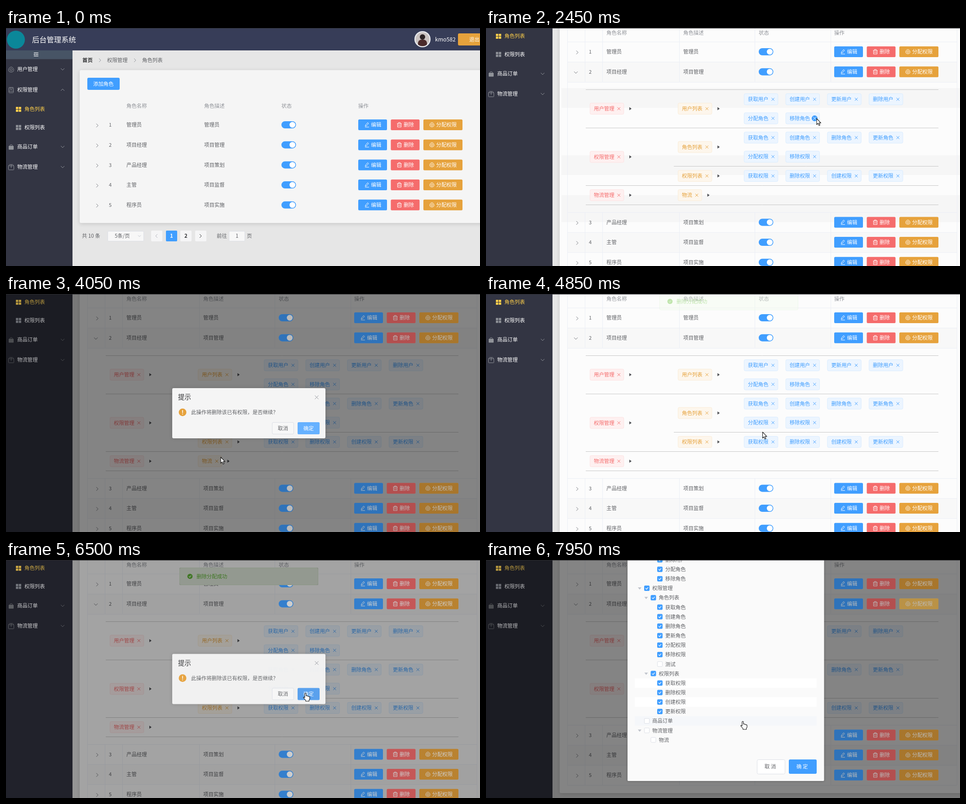
An HTML page with a canvas that plays this animation: 1055 px wide and 531 px high, repeating every 8000 ms.

```html
<!DOCTYPE html>
<html lang="zh-CN">
<head>
<meta charset="utf-8">
<style>
html, body { margin: 0; width: 100%; height: 100%; overflow: hidden; background: #e6e6e6; }
canvas { display: block; font-family: "Noto Sans CJK SC", sans-serif; }
</style>
</head>
<body>
<canvas id="stage" width="1055" height="531"></canvas>
<script>
const c = document.getElementById('stage').getContext('2d');
const W = 1055, H = 531, LOOP = 8000, ROW = 44.7;
const FONT = '"Noto Sans CJK SC","Noto Sans CJK",sans-serif';
const BLUE = '#409eff', RED = '#f56c6c', ORANGE = '#e6a23c';
const GRAY = '#909399', WHITE = '#fff', GOLD = '#ffd04b';
const TAGS = {
  red: ['#fef0f0', '#fde2e2', RED],
  orange: ['#fdf6ec', '#faecd8', ORANGE],
  blue: ['#ecf5ff', '#d9ecff', BLUE]
};
const ROLES = [['管理员', '管理员'], ['项目经理', '项目管理'], ['产品经理', '项目策划'], ['主管', '项目监督'], ['程序员', '项目实施']];
const MENU = [['用户管理', 92], ['权限管理', 138], ['商品订单', 265], ['物流管理', 310]];
// Leading dots give the depth, a trailing dash an unchecked box.
const TREE = ('用户管理 .用户列表 ..获取用户 ..创建用户 ..更新用户 ..删除用户 ..分配角色 ..移除角色 ' +
  '权限管理 .角色列表 ..获取角色 ..创建角色 ..删除角色 ..更新角色 ..分配权限 ..移除权限 ..测试- ' +
  '.权限列表 ..获取权限 ..删除权限 ..创建权限 ..更新权限 商品订单- 物流管理- .物流-').split(' ');
const EXPAND = 1100, DELETE_CHILD = 4750, DELETE_PARENT = 6760;
// time, x, y, hand
const POINTER = [
  [100, 1042, 22, 0], [400, 800, 250, 0], [800, 203, 257, 1], [1150, 203, 257, 0], [1350, 442, 280, 0],
  [1650, 600, 245, 0], [1850, 739, 197, 0], [2100, 739, 197, 0], [2125, 736, 202, 1], [2450, 736, 202, 0],
  [2900, 481, 371, 0], [3050, 480, 370, 0], [3350, 470, 372, 1], [3850, 468, 372, 0], [3950, 477, 365, 0],
  [4050, 478, 364, 0], [4400, 666, 298, 1], [4700, 666, 298, 0], [5350, 298, 371, 1], [5560, 298, 371, 0],
  [5650, 325, 363, 0], [6200, 665, 297, 1], [6600, 665, 297, 0], [7150, 958, 100, 1], [7300, 958, 100, 0],
  [7600, 640, 270, 1], [7900, 570, 360, 1]
];

const clamp = v => Math.max(0, Math.min(1, v));
const ramp = (t, start, length) => clamp((t - start) / length);
const smooth = v => v * v * (3 - 2 * v);

function box(x, y, w, h, r, fill, border) {
  c.beginPath();
  c.roundRect(x, y, w, h, r);
  if (fill) { c.fillStyle = fill; c.fill(); }
  if (border) { c.strokeStyle = border; c.lineWidth = 1; c.stroke(); }
}
function disc(x, y, r, fill) {
  c.beginPath();
  c.arc(x, y, r, 0, 7);
  c.fillStyle = fill;
  c.fill();
}
function line(color, width, ...p) {
  c.beginPath();
  for (let i = 0; i < p.length; i += 2) c.lineTo(p[i], p[i + 1]);
  c.strokeStyle = color;
  c.lineWidth = width;
  c.stroke();
}
function shape(fill, ...p) {
  c.beginPath();
  for (let i = 0; i < p.length; i += 2) c.lineTo(p[i], p[i + 1]);
  c.closePath();
  c.fillStyle = fill;
  c.fill();
}
function text(s, x, y, color = '#606266', size = 11.4, weight = 400) {
  c.font = `${weight} ${size}px ${FONT}`;
  c.fillStyle = color;
  c.fillText(s, x, y + size * .38);
}
const cross = (x, y, r, color) => {
  line(color, 1, x - r, y - r, x + r, y + r);
  line(color, 1, x + r, y - r, x - r, y + r);
};
function chevron(x, y, angle, color = GRAY, r = 4) {
  c.save();
  c.translate(x, y);
  c.rotate(angle);
  line(color, 1, -r / 2, -r, r / 2, 0, -r / 2, r);
  c.restore();
}
function check(x, y, r, color) {
  line(color, 1.3, x - r, y, x - r * .2, y + r * .75, x + r, y - r * .7);
}

function gear(x, y, r, color) {
  c.beginPath();
  for (let i = 0; i < 12; i++) {
    const a = i * Math.PI / 6 + .26, d = i % 4 < 2 ? r : r * .92;
    c.lineTo(x + d * Math.cos(a), y + d * Math.sin(a));
  }
  c.closePath();
  c.moveTo(x + r * .42, y);
  c.arc(x, y, r * .42, 0, 7);
  c.strokeStyle = color;
  c.lineWidth = 1;
  c.stroke();
}
function pencil(x, y) {
  line(WHITE, 1, x - 3.5, y + 3, x - 2.5, y, x + 2, y - 5, x + 4, y - 3, x - .5, y + 2, x - 3.5, y + 3);
  line(WHITE, 1, x - 4, y + 5, x + 5, y + 5);
}
function trash(x, y) {
  line(WHITE, 1, x - 5, y - 3, x + 5, y - 3);
  line(WHITE, 1, x - 2, y - 3, x - 2, y - 5, x + 2, y - 5, x + 2, y - 3);
  line(WHITE, 1, x - 4, y - 3, x - 4, y + 5, x + 4, y + 5, x + 4, y - 3);
  line(WHITE, 1, x - 1.5, y - 1, x - 1.5, y + 3);
  line(WHITE, 1, x + 1.5, y - 1, x + 1.5, y + 3);
}
function grid(x, y, color) {
  for (const dx of [-6, .5]) for (const dy of [-5.5, .5]) box(x + dx, y + dy, 5.3, 5, 0, color);
}

function stateAt(t) {
  const open = t >= EXPAND;
  const fade = (start, end) => ramp(t, start, 220) * (1 - ramp(t, end, 220));
  const confirm = Math.max(fade(3825, 4490), fade(5570, 6493));
  const assign = ramp(t, 7240, 260);
  // The backdrop leaves a little ahead of its dialog.
  const backdrop = Math.max(fade(3825, 4440), fade(5570, 6443), assign);
  let i = POINTER.findIndex(p => p[0] > t);
  if (i < 0) i = POINTER.length;
  const from = POINTER[Math.max(0, i - 1)], to = POINTER[Math.min(i, POINTER.length - 1)];
  const k = to === from ? 1 : smooth(ramp(t, from[0], to[0] - from[0]));
  return {
    t, open, confirm, assign,
    dim: .48 * backdrop,
    scroll: 163 * smooth(ramp(t, 1430, 350)),
    extra: !open ? 0 : t < DELETE_PARENT ? 291 : 248,
    cols: open ? [268, 439, 607, 775] : [268, 441, 613, 784],
    pointer: { x: from[1] + (to[1] - from[1]) * k, y: from[2] + (to[2] - from[2]) * k,
               hand: from[3], shown: t >= 100 }
  };
}
const rowY = (i, s) => 216 + i * ROW + (i > 1 ? s.extra : 0);

function drawHeader(s) {
  const shift = s.open ? -14 : 0;
  box(0, 0, W, 50, 0, '#373d58');
  disc(22, 26, 20, '#0b8799');
  text('后台管理系统', 58, 26, WHITE, 16.3, 500);
  disc(927 + shift, 25, 18, '#e9ebef');
  c.save();
  c.beginPath();
  c.arc(927 + shift, 25, 15.5, 0, 7);
  c.clip();
  box(905 + shift, 5, 44, 44, 0, '#c9c2c0');
  disc(927 + shift, 20, 6, '#2b2224');
  box(917 + shift, 26, 20, 24, 8, '#4a2a2a');
  c.restore();
  text('kmo582', 955 + shift, 25, WHITE, 12.2);
  box(1006 + shift, 12, 80, 27, 3, ORANGE);
  text('退出', 1031 + shift, 25.5, WHITE, 11.4, 500);
}

function drawSidebar() {
  box(0, 50, 148, 700, 0, '#333543');
  box(0, 50, 148, 19.5, 0, '#475465');
  for (const y of [55.5, 59, 62.5]) line(WHITE, 1.3, y === 59 ? 65 : 62, y, 72, y);
  shape(WHITE, 61.5, 59, 64, 57.3, 64, 60.7);
  MENU.forEach(([, y], i) => chevron(126, y, i === 1 ? -Math.PI / 2 : Math.PI / 2));
  gear(11.5, 93, 6, GRAY);
  box(6.5, 132.5, 10, 12, 1, null, GRAY);
  line(GRAY, 1, 6.5, 141, 16.5, 141);
  line(GRAY, 1, 9.5, 133, 9.5, 137, 13.5, 137, 13.5, 133);
  box(6, 263, 11, 8.5, 1, GRAY);
  c.beginPath(); c.arc(11.5, 263, 2.8, Math.PI, 0); c.stroke();
  box(5.5, 307.5, 12, 9, 1, null, GRAY);
  line(GRAY, 1, 5.5, 308, 8, 304.5, 15, 304.5, 17.5, 308);
  line(GRAY, 1, 11.5, 305, 11.5, 312);
}

function drawMenuLabels(s) {
  c.save();
  c.globalAlpha = 1 - s.dim * .65;
  MENU.forEach(([label, y]) => text(label, 25, y, WHITE, 11.4, 500));
  grid(28, 181.5, GOLD);
  text('角色列表', 41, 181, GOLD, 11.4, 500);
  grid(28, 222, GRAY);
  text('权限列表', 41, 222, WHITE, 11.4, 500);
  c.restore();
}

function drawPager() {
  text('共 10 条', 169, 464);
  box(226.5, 453.5, 80, 22, 2, '#f7f7f7', '#dcdfe6');
  text('5条/页', 242, 464);
  chevron(297, 464, Math.PI / 2, '#c0c4cc', 3);
  [323, 356, 388, 421].forEach((x, i) => box(x, 452, 25, 24, 2, i === 1 ? BLUE : '#f5f5f6'));
  chevron(335, 464, Math.PI, '#b0b3ba');
  text('1', 365, 464, WHITE, 11.4, 700);
  text('2', 397, 464, '#303133', 11.4, 700);
  chevron(433, 464, 0, '#303133');
  text('前往', 469, 464);
  box(496.5, 453.5, 35, 22, 2, '#f7f7f7', '#dcdfe6');
  text('1', 511, 464);
  text('页', 536, 464);
}

function drawTag(s, kind, label, x, y) {
  const [fill, border, color] = TAGS[kind], w = 31 + label.length * 11.3;
  box(x + .5, y - 12.5, w - 1, 25, 3, fill, border);
  text(label, x + 9, y, color);
  const cx = x + w - 11.5;
  const hover = !s.dim && s.pointer.shown &&
    Math.hypot(s.pointer.x - cx, s.pointer.y + s.scroll - y) < 6;
  if (hover) disc(cx, y, 6.5, color);
  cross(cx, y, 3.2, hover ? WHITE : color);
}
const caret = (x, y) => shape('#505256', x, y - 3.5, x + 5, y, x, y + 3.5);

function drawExpanded(s) {
  const rule = (x, y) => line('#c6c6c6', 1, x, y, 1007, y);
  const parent = (label, y) => { drawTag(s, 'red', label, 231, y); caret(319, y); };
  const child = (label, y) => { drawTag(s, 'orange', label, 427, y); caret(470 + label.length * 11.3, y); };
  const leaves = (names, y) => names.split(' ').forEach((n, i) => drawTag(s, 'blue', n, 574 + i * 92.7, y));
  rule(222, 300.5); rule(222, 386); rule(418, 471.5); rule(222, 514.5);
  parent('用户管理', 343);
  child('用户列表', 343);
  leaves('获取用户 创建用户 更新用户 删除用户', 322);
  leaves('分配角色 移除角色', 364.5);
  parent('权限管理', 450.5);
  child('角色列表', 428.5);
  leaves('获取角色 创建角色 删除角色 更新角色', 407.5);
  leaves('分配权限 移除权限', 450);
  child('权限列表', 493);
  leaves('获取权限 删除权限 创建权限 更新权限', 493);
  if (s.t < DELETE_PARENT) {
    parent('物流管理', 536);
    if (s.t < DELETE_CHILD) child('物流', 536);
    rule(222, 557.5);
  }
}

function drawCard(s) {
  const bottom = 435 + s.extra;
  c.save();
  c.shadowColor = 'rgba(0,0,0,.14)';
  c.shadowBlur = 10;
  c.shadowOffsetY = 2;
  box(164, 94, 950, bottom - 94, 3, s.open ? '#fcfcfc' : '#f5f5f5');
  c.restore();
  if (!s.open) return;
  if (!s.scroll) box(164, 94, W, 100, 0, '#f8f8f8');
  if (s.t < 3850) {
    const bands = s.scroll ? [[134, 44], [284, 44], [373, 60]] : [[284, 44], [373, 60]];
    bands.forEach(([y, h]) => box(168, y + s.scroll, W, h, 0, '#f6f6f6'));
  }
  const edge = '#ebeef5';
  const py = s.pointer.y + s.scroll;
  ROLES.forEach((_, i) => {
    const top = rowY(i, s) - 22;
    const hover = !s.dim && py >= top && py < top + ROW;
    if (hover || i % 2) box(181, top, 867, ROW, 0, hover ? '#f5f7fa' : '#f8f8f8');
  });
  line(edge, 1, 181.5, 155, 181.5, bottom - 18);
  line(edge, 1, 1048.5, 155, 1048.5, bottom - 18);
  const columns = (top, end) => [220.5, 259.5, 430.5, 598.5, 767.5].forEach(x => line(edge, 1, x, top, x, end));
  columns(155, 283);
  columns(283 + s.extra, bottom - 18);
  [194, 239, 284].forEach(y => line(edge, 1, 181, y, 1048, y));
  [0, 1, 2, 3].forEach(i => line(edge, 1, 181, 283.5 + s.extra + i * ROW, 1048, 283.5 + s.extra + i * ROW));
  drawExpanded(s);
}

function drawTable(s) {
  box(181, 111, 72, 27, 3, BLUE);
  text('添加角色', 194, 125, WHITE, 11.4, 500);
  ['角色名称', '角色描述', '状态', '操作'].forEach((h, i) => text(h, s.cols[i], 174, GRAY, 11.4, 500));
  ROLES.forEach((role, i) => {
    const y = rowY(i, s), turn = i === 1 ? ramp(s.t, EXPAND, 180) : 0;
    chevron(203 - 3 * turn, y + 1.5, turn * Math.PI / 2, '#707379');
    text(i + 1, 229, y, '#606266', 11);
    role.forEach((label, j) => text(label, s.cols[j], y));
  });
}

function drawControls(s) {
  const shade = `rgba(0,0,0,${s.dim * .56})`;
  ROLES.forEach((_, i) => {
    const y = rowY(i, s), tx = s.cols[2], x = s.cols[3];
    box(tx, y - 8, 32.5, 16, 8, BLUE);
    disc(tx + 24.5, y, 6.5, WHITE);
    box(tx, y - 8, 32.5, 16, 8, shade);
    const hovered = i === 1 && s.t > 7100;
    [[0, 64, BLUE, '编辑'], [72.5, 64, RED, '删除'], [145, 87, hovered ? '#ffc860' : ORANGE, '分配权限']].forEach(([dx, w, fill, label], j) => {
      const bx = x + dx;
      box(bx, y - 12, w, 24, 2.5, fill);
      [pencil, trash, (gx, gy) => gear(gx, gy, 5, WHITE)][j](bx + 19, y);
      text(label, bx + 28.5, y, WHITE, 11.4, 500);
      box(bx, y - 12, w, 24, 2.5, shade);
    });
  });
}

function drawMessage(s, start, y) {
  const k = ramp(s.t, start, 260);
  if (!k) return;
  c.save();
  c.globalAlpha = k;
  c.translate(0, y - 30 * (1 - smooth(k)));
  box(386.5, .5, 308, 38, 3, '#f0f9eb', '#e1f3d8');
  disc(409.5, 19.5, 5.8, '#67c23a');
  check(409.5, 19.5, 2.6, WHITE);
  text('删除分配成功', 424, 19.5, '#67c23a');
  box(386, 0, 309, 39, 3, `rgba(0,0,0,${s.dim * 1.1})`);
  c.restore();
}

function drawConfirm(s) {
  if (!s.confirm) return;
  const { x, y } = s.pointer;
  const hover = x > 649 && x < 698 && y > 286 && y < 313;
  c.save();
  c.globalAlpha = s.confirm;
  c.translate(0, -16 * (1 - s.confirm));
  c.shadowColor = 'rgba(0,0,0,.15)';
  c.shadowBlur = 8;
  box(370, 210, 341, 112, 3, '#f5f5f5');
  c.shadowBlur = 0;
  text('提示', 383, 230, '#303133', 14.4);
  cross(691.5, 230.5, 4, GRAY);
  disc(393, 264, 8.5, ORANGE);
  line(WHITE, 1.6, 393, 259, 393, 265.5);
  disc(393, 268, 1, WHITE);
  text('此操作将删除该已有权限，是否继续？', 412, 264);
  box(592.5, 286.5, 48, 26, 2.5, '#f7f7f7', '#dcdfe6');
  text('取消', 605, 299.5);
  box(649, 286, 49, 27, 2.5, hover ? '#559fee' : '#66b1ff');
  text('确定', 662, 299.5, WHITE, 11.4, 500);
  c.restore();
}

function drawAssign(s) {
  if (!s.assign) return;
  const lift = 252 * (1 - smooth(ramp(s.t, 7520, 330)));
  c.save();
  c.globalAlpha = s.assign;
  c.translate(0, lift - 16 * (1 - s.assign));
  c.shadowColor = 'rgba(0,0,0,.3)';
  c.shadowBlur = 5;
  box(315, -172, 437.5, 665, 2, '#fafafa');
  c.shadowBlur = 0;
  text('分配权限', 331, -148, '#303133', 14.4);
  cross(731, -150, 4, GRAY);
  TREE.forEach((entry, i) => {
    const level = entry.lastIndexOf('.') + 1, off = entry.endsWith('-');
    const y = 63 + 21.15 * (i - 8), x = 358 + 14.5 * level;
    const hover = Math.abs(s.pointer.y - lift - y) < 10.6 && s.pointer.x < 736;
    if (hover) box(331, y - 10.5, 405, 21, 0, '#f5f7fa');
    else if (s.t > 7850 && (i === 18 || i === 20)) box(331, y - 10.5, 405, 21, 0, WHITE);
    if (level < 2 && i !== 22 && i !== 24) shape('#c0c4cc', x - 20, y - 2, x - 12, y - 2, x - 16, y + 3);
    box(x - 5.5, y - 5.5, 11, 11, 1.5, off ? WHITE : BLUE, off ? '#dcdfe6' : BLUE);
    if (!off) check(x, y, 3, WHITE);
    text(entry.replace(/[.-]/g, ''), x + 12, y);
  });
  box(603.5, 445.5, 62, 32, 3, WHITE, '#dcdfe6');
  text('取 消', 620, 461);
  box(674, 445, 62, 32, 3, BLUE);
  text('确 定', 691, 461, WHITE, 11.4, 500);
  c.restore();
}

function drawPointer({ x, y, hand, shown }) {
  if (!shown) return;
  c.save();
  c.translate(x, y);
  c.lineJoin = 'round';
  const path = hand
    ? 'M0 1Q1.5-1 3 1V6Q5 5 5.7 6.8Q8 6 8.4 7.8Q11 7 11 9.5V13L9.5 15.5V18H2V16L-2.8 10.5Q-3.5 8 0 10Z'
    : 'M0 0V13.5L3 10.7L5.2 15.6L7.4 14.6L5.2 9.9H9.4Z';
  const p = new Path2D(path);
  c.fillStyle = WHITE;
  c.fill(p);
  c.strokeStyle = '#111';
  c.lineWidth = 1.1;
  c.stroke(p);
  c.restore();
}

function render(t) {
  const s = stateAt(t);
  box(0, 0, W, H, 0, '#e6e6e6');
  c.save();
  c.translate(0, -s.scroll);
  drawCard(s);
  drawTable(s);
  text('首页', 170, 72, '#303133', 11.4, 700);
  text('权限管理', 225, 72);
  text('角色列表', 303, 72);
  chevron(209, 72, 0);
  chevron(287, 72, 0);
  if (!s.open) drawPager();
  drawSidebar();
  drawHeader(s);
  c.restore();
  box(0, 0, W, H, 0, `rgba(0,0,0,${s.dim})`);
  c.save();
  c.translate(0, -s.scroll);
  drawControls(s);
  drawMenuLabels(s);
  c.restore();
  drawMessage(s, DELETE_CHILD, 17);
  drawMessage(s, 6800, 68);
  drawConfirm(s);
  drawAssign(s);
  drawPointer(s.pointer);
  box(0, 0, W, 1, 0, '#2c2c30');
}

const began = performance.now();
function tick() {
  render((performance.now() - began) % LOOP);
  requestAnimationFrame(tick);
}
tick();
</script>
</body>
</html>
```
